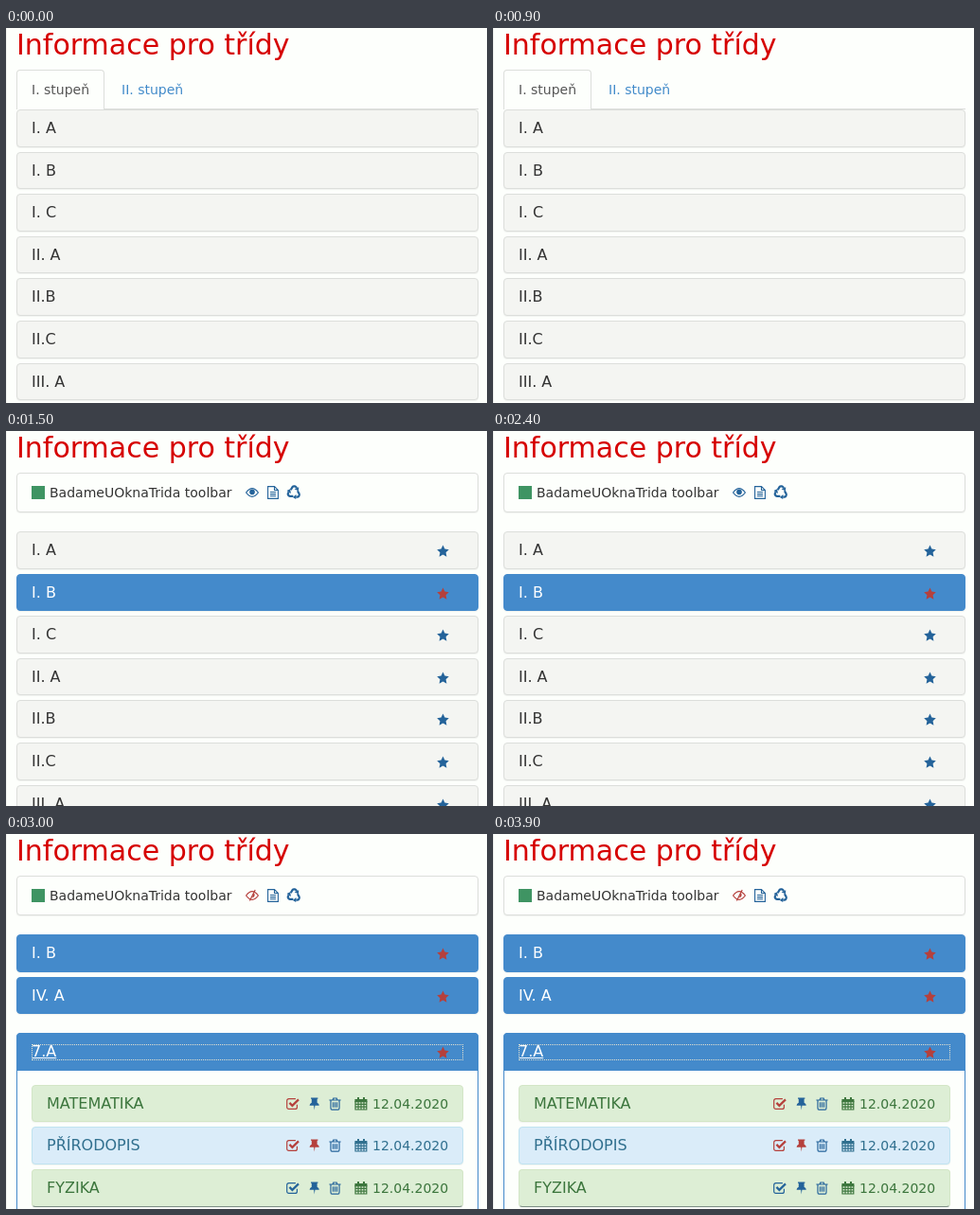
An HTML page that plays this animation: 508x396 px, repeating every 4500 ms.

```html
<!DOCTYPE html>
<html lang="cs">
<head>
<meta charset="utf-8">
<title>Informace pro třídy</title>
<style>
  * { box-sizing: border-box; }
  html, body { margin: 0; width: 100%; height: 100%; overflow: hidden; }
  body {
    position: relative;
    background: #fdfffc;
    border-left: 1px solid #f0f2ef;
    color: #333;
    font: 14px/20px "DejaVu Sans", sans-serif;
  }
  #stage { position: absolute; left: -1px; top: 0; width: 508px; height: 396px; overflow: hidden; }
  #stage div, #stage span, #stage svg { position: absolute; white-space: pre; }
  #stage .scene { inset: 0; visibility: hidden; }
  .title { left: 11px; top: 1px; font-size: 30px; line-height: 33px; color: #d60000; }
  .panel {
    height: 39.6px;
    border: 1px solid #dcdedb;
    border-radius: 4px;
    background: #f4f5f2;
    box-shadow: 0 1px 1px rgba(0, 0, 0, .05);
  }
  .panel > .name { left: 15px; top: 10px; font-size: 16px; line-height: 17.6px; }
  .panel > .date { left: 359px; top: 9px; }
  .primary { background: #448acb; border-color: #448acb; color: #fff; }
  .success { background: #ddeed5; border-color: #d3e6c6; color: #3c763d; }
  .info { background: #daecf9; border-color: #bfe3f0; color: #31708f; }
  .last { border-bottom-color: #7d8f86; }
  .bar { left: 11px; top: 44px; width: 488px; height: 42px; background: #fdfffc; }
  .logo { left: 27px; top: 58px; width: 14px; height: 14px; background: #3f9463; }
  .rule { left: 11px; top: 85px; width: 488px; height: 1px; background: #dcdedb; }
  .tab {
    left: 11px; top: 44px; width: 93px; height: 42px;
    border: 1px solid #dcdedb; border-bottom: 0;
    border-radius: 4px 4px 0 0;
    background: #fdfffc;
  }
  .open { left: 11px; top: 210.2px; width: 488px; height: 220px; background: #fdfffc; border: 1px solid #448acb; border-radius: 4px; }
  .head { left: 11px; top: 210.2px; width: 488px; height: 39.6px; border-radius: 4px 4px 0 0; box-shadow: none; }
  .focus { left: 27px; top: 222px; width: 456px; height: 17px; border: 1px dotted #e6e2cf; }
  .head > .name { text-decoration: underline; }
  svg { width: 15px; height: 14px; overflow: visible; fill: none; stroke: currentColor; stroke-width: 1.2; }
  svg .f { fill: currentColor; stroke: none; }
  .blue { color: #24639a; }
  .red { color: #b5403c; }
</style>
</head>
<body>
<div id="stage"><div class="title">Informace pro třídy</div></div>
<script>
const LOOP = 4500, STEP = 1500, PITCH = 44.6;
const stage = document.getElementById('stage');

const lens = '<path d="M.6 7Q7-1.6 13.4 7Q7 15.6.6 7z"/>';
const arrow = '<path d="M3.7 5.2L5.5 2.2Q6.1 1.3 7.2 1.3H8.2Q8.8 1.3 9.4 2.3L10 3.4" stroke-width="2.2"/>' +
  '<path class="f" d="M7.6 4.6L12.2 2.2 12 6.2z"/>';
const ICONS = {
  star: '<path class="f" d="M6.5.6l1.9 4 4.4.6-3.2 3.1.8 4.4-3.9-2.1-3.9 2.1.8-4.4L.2 5.2l4.4-.6z"/>',
  eye: lens + '<circle class="f" cx="7" cy="6.4" r="2.8"/>',
  eyeOff: lens + '<path class="f" d="M8.6 4.2A2.8 2.8 0 0 1 7 9.2z"/><path d="M10.2 1L4.4 12.6"/>',
  file: '<path d="M.6.6h6.9l3.9 3.9v8.9H.6zM7.5.6v3.9h3.9M3 6.5h6M3 8.6h6M3 10.7h6" stroke-width="1.1"/>',
  recycle: [0, 120, 240].map(a => `<g transform="rotate(${a} 7 7.8)">${arrow}</g>`).join(''),
  check: '<path d="M11.4 7.8v2.6a2 2 0 0 1-2 2H2.7a2 2 0 0 1-2-2V3.7a2 2 0 0 1 2-2h7.2"/>' +
    '<path d="M3.4 5.9l3 3L13 2.4" stroke-width="2.2"/>',
  pin: '<path class="f" d="M2 .4h7.4v1.4H8.6v4q2.2 1 2.2 3H6.4L5.8 13.4 5.1 8.8H.6q0-2 2.2-3v-4H2z"/>',
  trash: '<path d="M.4 3h12.2M4.2 2.8L4.8 1h3.4l.6 1.8M2 3v8.6q0 1.6 1.2 1.6h6.6q1.2 0 1.2-1.6V3M4.5 5.2v5.6M6.5 5.2v5.6M8.5 5.2v5.6"/>',
  calendar: '<path class="f" d="M.4 2h13v3.2H.4zM3 0h2v4H3zM9 0h2v4H9z"/>' +
    '<path d="M1 4v9h11.8V4M1 7.4h12M1 10.2h12M4 5v8M7 5v8M10 5v8"/>'
};

function add(parent, cls, text = '', style = {}) {
  const el = document.createElement('div');
  el.className = cls;
  el.textContent = text;
  for (const k in style) el.style[k] = style[k] + (k === 'color' ? '' : 'px');
  parent.append(el);
  return el;
}

function icon(parent, name, left, top, cls = '') {
  parent.insertAdjacentHTML('beforeend',
    `<svg class="${cls}" style="left:${left}px;top:${top}px">${ICONS[name]}</svg>`);
}

function panel(parent, name, top, cls = '', left = 11, width = 488) {
  const el = add(parent, 'panel ' + cls, '', { left, top, width });
  add(el, 'name', name);
  return el;
}

function starred(parent, name, top, on) {
  const el = panel(parent, name, top, on ? 'primary' : '');
  icon(el, 'star', 443, 13, on ? 'red' : 'blue');
}

function toolbar(parent, eye, eyeColor) {
  add(parent, 'panel bar');
  add(parent, 'logo');
  add(parent, '', 'BadameUOknaTrida toolbar', { left: 46, top: 55 });
  icon(parent, eye, 253, 58, eyeColor);
  icon(parent, 'file', 276, 58, 'blue');
  icon(parent, 'recycle', 297, 57, 'blue');
}

function subject(parent, name, row, cls, checkColor, pinColor) {
  const el = panel(parent, name, 264.8 + row * PITCH, cls, 27, 456);
  icon(el, 'check', 268, 12, checkColor);
  icon(el, 'pin', 292, 12, pinColor);
  icon(el, 'trash', 313, 12, 'blue');
  icon(el, 'calendar', 340, 12);
  add(el, 'date', '12.04.2020');
}

const classes = ['I. A', 'I. B', 'I. C', 'II. A', 'II.B', 'II.C', 'III. A'];

const scenes = [
  s => {
    add(s, 'rule');
    add(s, 'tab');
    add(s, '', 'I. stupeň', { left: 27, top: 55, color: '#555' });
    add(s, '', 'II. stupeň', { left: 122, top: 55, color: '#428bca' });
    classes.forEach((c, i) => panel(s, c, 86 + i * PITCH));
  },
  s => {
    toolbar(s, 'eye', 'blue');
    classes.forEach((c, i) => starred(s, c, 106 + i * PITCH, i === 1));
  },
  s => {
    toolbar(s, 'eyeOff', 'red');
    ['I. B', 'IV. A'].forEach((c, i) => starred(s, c, 106 + i * PITCH, true));
    add(s, 'open');
    const head = panel(s, '7.A', 210.2, 'primary head');
    icon(head, 'star', 443, 13, 'red');
    add(s, 'focus');
    subject(s, 'MATEMATIKA', 0, 'success', 'red', 'blue');
    subject(s, 'PŘÍRODOPIS', 1, 'info', 'red', 'red');
    subject(s, 'FYZIKA', 2, 'success last', 'blue', 'blue');
  }
];

scenes.forEach((build, i) => {
  const scene = add(stage, 'scene');
  build(scene);
  scene.animate([
    { visibility: 'visible', offset: 0, easing: 'step-end' },
    { visibility: 'hidden', offset: STEP / LOOP, easing: 'step-end' },
    { visibility: 'hidden', offset: 1 }
  ], { duration: LOOP, iterations: Infinity, delay: i * STEP - (i && LOOP) });
});
</script>
</body>
</html>
```
